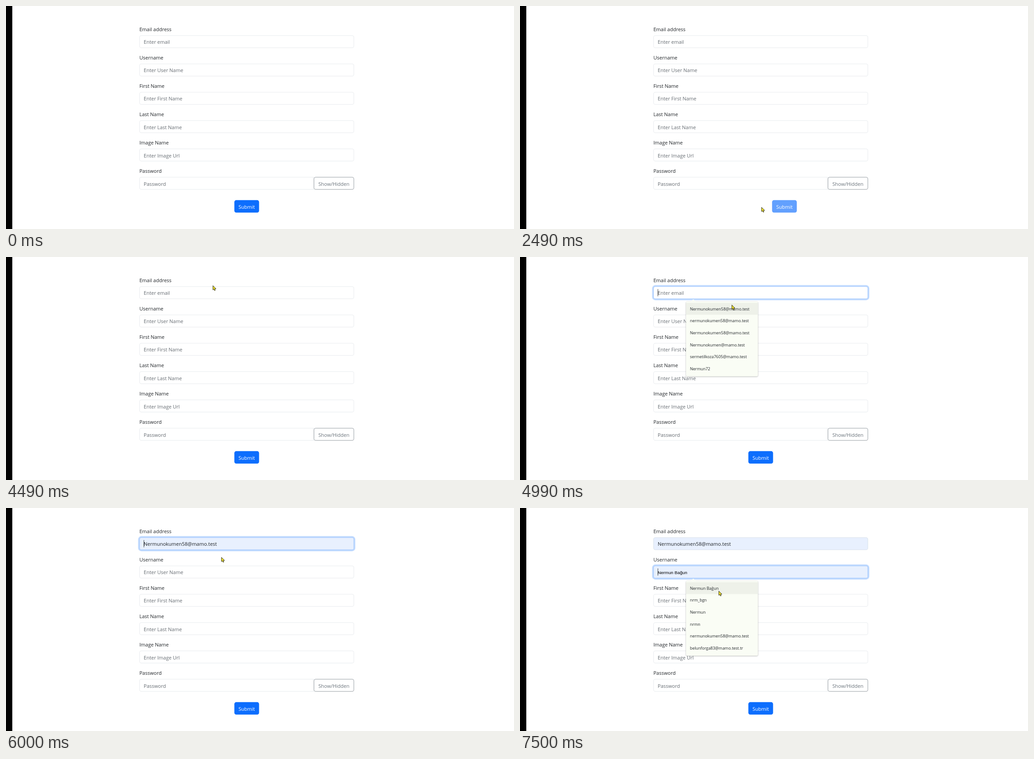
Recreate the animation shown at these times as an HTML page. Size 1129x496 px, loop 8000 ms.

```html
<!DOCTYPE html>
<html lang="en">
<head>
<meta charset="utf-8">
<title>Sign-up form</title>
<style>
  html, body { margin: 0; width: 100%; height: 100%; overflow: hidden; background: #fff; }
  #stage { position: relative; width: 1129px; height: 496px; overflow: hidden; background: #fff; }
  #stage * { position: absolute; box-sizing: border-box; white-space: pre; }
  .bar { left: 0; top: 0; width: 14px; height: 100%; background: #000; }
  /* The form is laid out at full size and shown at 63/86 scale. */
  #form {
    left: 0; top: 0; width: 651px; height: 600px;
    transform-origin: 0 0; transform: translate(296.5px, 42px) scale(.7326);
    font: 15px/24px "Open Sans", "Noto Sans", sans-serif; color: #212529;
  }
  label { left: 0; }
  .field {
    left: 0; width: 651px; height: 38px; border: 1px solid #dee2e6;
    border-radius: 6px; background: #fff;
  }
  .field span { left: 12px; top: 7px; color: #666c72; }
  .field.filled { background: #e8f0fe; border-color: #d0d9e4; }
  .field.filled span { color: #212529; }
  .field.preview span { top: 8px; font: 13.33px/24px "Liberation Sans", Arial, sans-serif; color: #000; }
  .field.focus { border-color: #86b7fe; box-shadow: 0 0 0 4px #c2dbfe; }
  .field i { left: 12px; top: 7px; width: 1px; height: 22px; background: #000; display: none; }
  .field.caret i { display: block; }
  .secret { width: 530px; border-radius: 6px 0 0 6px; }
  .toggle {
    right: 0; top: 462px; width: 122px; height: 38px; border: 1px solid #6c757d;
    border-radius: 6px; color: #6c757d; text-align: center; line-height: 38px; background: #fff;
  }
  #submit {
    left: 288px; top: 532px; width: 75px; height: 38px; border-radius: 6px;
    background: #0d6efd; color: #fff; text-align: center; line-height: 40px;
  }
  .list {
    left: 99px; width: 218px; height: 227px; border-radius: 4px; background: #fafdf5;
    box-shadow: 0 1px 4px rgba(0, 0, 0, .32); font-size: 12.2px;
  }
  .list::before {
    content: ""; position: absolute; left: 14px; top: -7px;
    border: 8px solid transparent; border-top: 0; border-bottom: 7px solid #fafdf5;
  }
  .list div { left: 0; width: 218px; height: 36.2px; padding-left: 12px; line-height: 37px; }
  .list.hot div:first-child { background: #eef1e9; }
  svg { overflow: visible; left: 0; top: 0; width: 9px; height: 13px; }
</style>
</head>
<body>
<div id="stage">
  <div class="bar"></div>
  <div id="form"><div id="submit">Submit</div></div>
</div>
<script>
const stage = document.getElementById('stage');
const form = document.getElementById('form');
const submit = document.getElementById('submit');
const LOOP = 8000;
const PITCH = 86;
const MAIL = 'Nermunokumen58@mamo.test';
const USER = 'Nermun Bağun';

function add(parent, tag, cls, text, top) {
  const el = document.createElement(tag);
  el.className = cls;
  el.textContent = text;
  if (top !== undefined) el.style.top = top + 'px';
  return parent.appendChild(el);
}

const rows = [
  ['Email address', 'Enter email'], ['Username', 'Enter User Name'],
  ['First Name', 'Enter First Name'], ['Last Name', 'Enter Last Name'],
  ['Image Name', 'Enter Image Url'], ['Password', 'Password'],
];
const fields = rows.map(([name, hint], i) => {
  add(form, 'label', '', name, 1 + PITCH * i);
  const base = i === 5 ? 'field secret' : 'field';
  const box = add(form, 'div', base, '', 32 + PITCH * i);
  const text = add(box, 'span', '', hint);
  add(box, 'i', '', '');
  return { box, text, hint, base };
});
add(form, 'div', 'toggle', 'Show/Hidden');

function makeList(row, items) {
  const list = add(form, 'div', 'list', '', 77.5 + PITCH * row);
  items.forEach((item, i) => add(list, 'div', '', item, 4.5 + 36.2 * i));
  return list;
}
const lists = [
  makeList(0, [MAIL, MAIL.toLowerCase(), MAIL, 'Nermunokumen@mamo.test',
    'sermetilkoza7605@mamo.test', 'Nermun72']),
  makeList(1, [USER, 'nrm_bgn', 'Nermun', 'nrmn', MAIL.toLowerCase(),
    'belunforga83@mamo.test.tr']),
];

stage.insertAdjacentHTML('beforeend', `
  <svg id="arrow"><path d="M.9 .7V10.2L3 8.4 4.5 11.7 6.2 10.9 4.8 7.7H7.8Z"
    fill="#f4e52a" stroke="#25251c" stroke-width=".95" stroke-linejoin="round"/></svg>
  <svg id="beam"><path d="M1 1H7M4 1V11M1 11H7" fill="none" stroke="#3d2f0c" stroke-width="2.4"/>
    <path d="M1.5 1H6.5M4 1V11M1.5 11H6.5" fill="none" stroke="#c9942e" stroke-width=".8"/></svg>`);
const pointers = { arrow: document.getElementById('arrow'), beam: document.getElementById('beam') };

// at: start time, p: pointer place, dx: button dodge, mail/user: field classes, list: open list
const steps = [
  { at: 0 },
  { at: 500, p: [920, 409] },
  { at: 990, p: [783, 233] },
  { at: 1490, p: [878, 301] },
  { at: 1990, p: [585, 440] },
  { at: 2490, p: [536, 447], dx: 72 },
  { at: 2990, p: [610, 446], dx: -7 },
  { at: 3500, p: [530, 446], dx: 76 },
  { at: 3990, p: [540, 303], dx: 20 },
  { at: 4490, p: [459, 63] },
  { at: 4990, p: [470, 106], mail: 'focus caret', list: 0, hot: true },
  { at: 5490, p: [478, 109], mail: 'focus filled preview', list: 0, hot: true },
  { at: 6000, p: [478, 109], mail: 'focus filled caret' },
  { at: 6500, p: [442, 142], beam: true, mail: 'filled', user: 'focus caret', list: 1 },
  { at: 7000, p: [438, 172], mail: 'filled', user: 'focus filled preview', list: 1, hot: true },
  { at: 7500, p: [441, 184], mail: 'filled', user: 'focus filled preview caret', list: 1, hot: true },
];

function setField(field, state = '', value) {
  field.box.className = field.base + ' ' + state;
  field.text.textContent = state.includes('filled') ? value : field.hint;
}

function show(step) {
  setField(fields[0], step.mail, MAIL);
  setField(fields[1], step.user, USER);
  lists.forEach((list, i) => {
    list.style.display = step.list === i ? 'block' : 'none';
    list.classList.toggle('hot', !!step.hot);
  });
  submit.style.transform = `translateX(${step.dx || 0}px)`;
  submit.style.background = step.dx ? '#62a0fe' : '#0d6efd';
  const active = step.beam ? 'beam' : 'arrow';
  for (const [name, el] of Object.entries(pointers)) {
    el.style.display = step.p && name === active ? 'block' : 'none';
    if (step.p) el.style.transform = `translate(${step.p[0]}px, ${step.p[1]}px)`;
  }
}

let current;
const start = performance.now();
function tick() {
  const t = (performance.now() - start) % LOOP;
  const step = steps.findLast(s => s.at <= t);
  if (step !== current) show(current = step);
  requestAnimationFrame(tick);
}
tick();
</script>
</body>
</html>
```
